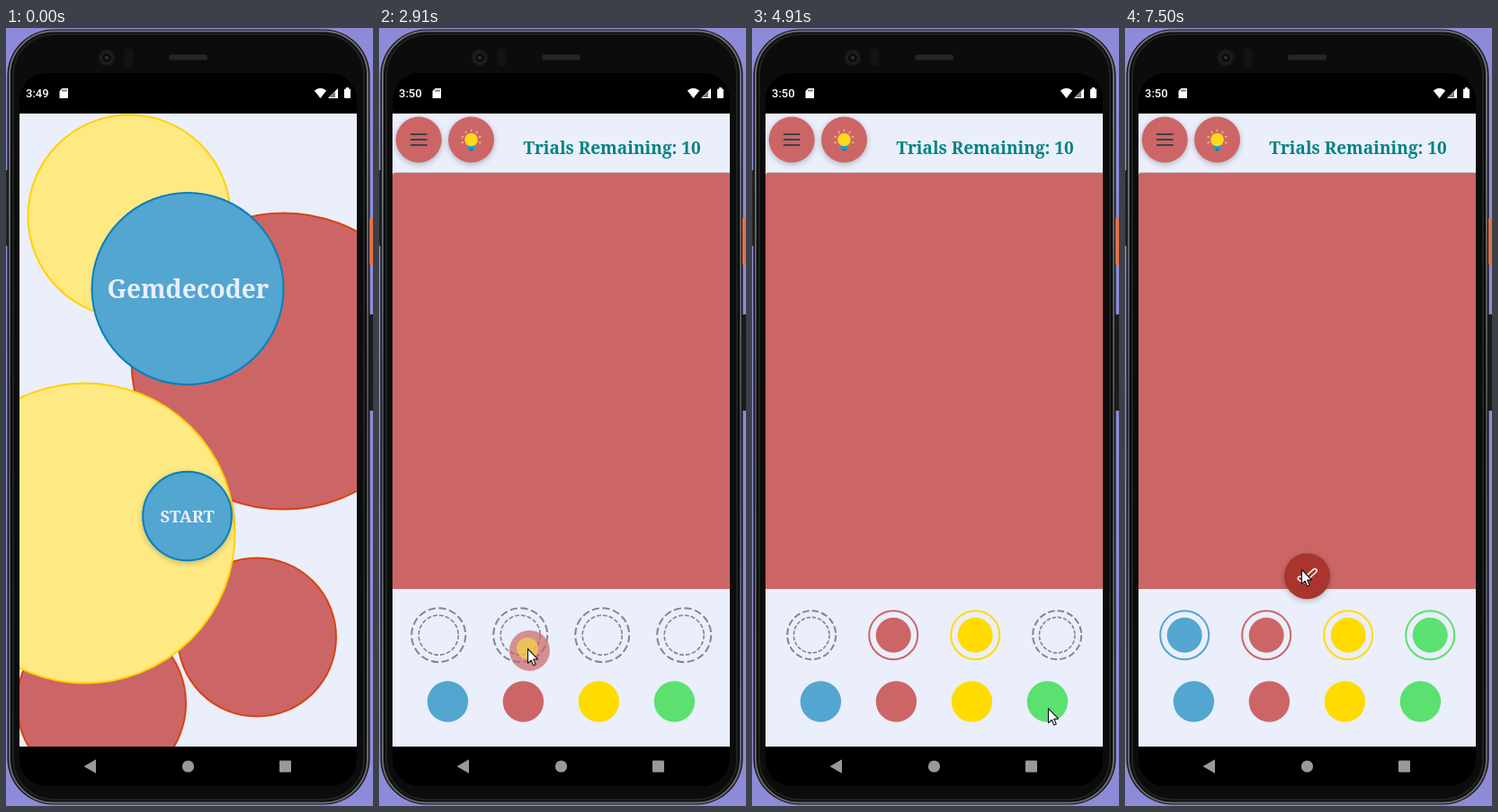
Recreate the animation shown at these times as an HTML page with a canvas. Size 408 px wide and 864 px high, loop 8 s.

```html
<!DOCTYPE html>
<html lang="en">
<head>
<meta charset="utf-8">
<title>Colour code game</title>
<style>
html, body { margin: 0; width: 100%; height: 100%; overflow: hidden; background: #8d8bd8; }
canvas { display: block; width: 408px; height: 864px; }
</style>
</head>
<body>
<canvas id="stage"></canvas>
<script>
const W = 408, H = 864, LOOP = 8000, TAU = Math.PI * 2;
const canvas = document.getElementById('stage');
const dpr = window.devicePixelRatio || 1;
canvas.width = W * dpr;
canvas.height = H * dpr;
const c = canvas.getContext('2d');

const PALE = '#ebeefb', RED = '#cc6666', BLUE = '#52a6d0', GRAY = '#858588';
const COLORS = [BLUE, RED, '#ffdb00', '#5ae170'];
const DISPLAY = '"Noto Serif", serif';
const slotX = i => 66.2 + 91 * i;
const potX = i => 76.4 + 84 * i;
const SLOT_Y = 674.2, POT_Y = 748, FAB_AT = 6980;

// Pointer path: time, x, y
const PATH = [
  [380, 333, 663], [840, 196, 545], [1770, 196, 545], [2110, 172, 734],
  [2640, 172, 734], [2910, 165, 689], [3120, 160, 678], [3300, 160, 678],
  [3510, 178, 706], [3800, 246, 761], [3960, 246, 760], [4250, 248, 690],
  [4400, 250, 680], [4540, 252, 682], [4860, 329, 755], [5110, 329, 757],
  [5440, 362, 657], [5580, 348, 668], [5700, 346, 671], [6220, 79, 761],
  [6380, 77, 748], [6460, 77, 748], [6780, 68, 682], [7000, 68, 680],
  [7400, 196, 601]
];

// Each drag: palette index, press, lift and drop times
const DRAGS = [
  { k: 1, press: 2570, lift: 2640, drop: 3260 },
  { k: 2, press: 3840, lift: 3920, drop: 4480 },
  { k: 3, press: 4980, lift: 5050, drop: 5660 },
  { k: 0, press: 6330, lift: 6400, drop: FAB_AT }
];

const clamp = v => Math.max(0, Math.min(1, v));
const ease = v => v * v * (3 - 2 * v);

function pointer(t) {
  let i = 0;
  while (i < PATH.length - 1 && PATH[i + 1][0] <= t) i++;
  const a = PATH[i], b = PATH[i + 1] || a;
  const p = b === a ? 0 : ease(clamp((t - a[0]) / (b[0] - a[0])));
  return [a[1] + (b[1] - a[1]) * p, a[2] + (b[2] - a[2]) * p];
}

function paint(fill, stroke, width) {
  if (fill) { c.fillStyle = fill; c.fill(); }
  if (stroke) { c.strokeStyle = stroke; c.lineWidth = width; c.stroke(); }
}

function disc(x, y, r, fill, stroke, width = 2) {
  c.beginPath();
  c.arc(x, y, r, 0, TAU);
  paint(fill, stroke, width);
}

function box(x, y, w, h, r, fill, stroke, width) {
  c.beginPath();
  c.roundRect(x, y, w, h, r);
  paint(fill, stroke, width);
}

function shape(points, fill, stroke, width, open) {
  c.beginPath();
  points.forEach(([x, y]) => c.lineTo(x, y));
  if (!open) c.closePath();
  paint(fill, stroke, width);
}

function text(s, x, y, font, color, align = 'center') {
  c.font = font;
  c.fillStyle = color;
  c.textAlign = align;
  c.fillText(s, x, y);
}

function raised(x, y, r, fill) {
  c.save();
  c.shadowColor = 'rgba(0,0,0,.25)';
  c.shadowBlur = 6 * dpr;
  c.shadowOffsetY = 2 * dpr;
  disc(x, y, r, fill);
  c.restore();
}

function dashed(x, y, r, color, width, count) {
  const step = TAU * r / count;
  c.setLineDash([step * .7, step * .3]);
  disc(x, y, r, null, color, width);
  c.setLineDash([]);
}

function phone() {
  c.fillStyle = '#8d8bd8';
  c.fillRect(0, 0, W, H);
  box(-3, 158, 7, 84, 2, '#29292b');
  box(1.5, 1.5, 403, 861, 51, '#161617');
  const rim = c.createLinearGradient(0, 0, 0, H);
  rim.addColorStop(0, '#6a6c6e');
  rim.addColorStop(.12, '#707274');
  rim.addColorStop(.5, '#4a4c4e');
  rim.addColorStop(1, '#6a6c6e');
  box(4, 3.5, 398, 857, 49, '#0c0c0d', rim, 2);
  box(8, 7, 390, 850, 45, '#0c0c0d', '#202122', 2);
  box(15, 50, 375, 792, 30, '#000');
  box(404, 211, 8, 52, 1, '#e0714a');
  box(404, 318, 8, 107, 1, '#1b1b1d');

  disc(112, 33, 9.5, '#171718');
  disc(112, 33, 6, '#0c0c0d', '#242527', 1.5);
  disc(112, 33, 2, '#303234');
  box(131.5, 23, 10, 20, 4, '#131314');
  box(181, 29.5, 43, 6, 3, '#262628');
}

function bars(t) {
  text(t < 640 ? '3:49' : '3:50', 22, 77.3, '500 13px Roboto, sans-serif', '#fff', 'left');
  shape([[62.5, 67], [69, 67], [69, 78], [59.5, 78], [59.5, 70]], '#fff');
  c.fillStyle = '#000';
  [62.5, 64.5, 66.5].forEach(x => c.fillRect(x, 68.5, 1, 2));
  c.beginPath();
  c.moveTo(349.5, 78);
  c.lineTo(342.8, 69.5);
  c.quadraticCurveTo(349.5, 64.2, 356.2, 69.5);
  c.closePath();
  paint('#fff');
  shape([[369, 67], [369, 78], [358, 78]], '#fff');
  shape([[366, 70.5], [366, 77], [359.8, 77]], '#777');
  box(376, 67.5, 7, 10.5, 1, '#fff');
  box(378, 66, 3, 2, 0, '#fff');

  shape([[86.5, 820], [100, 812.3], [100, 827.7]], '#999');
  disc(202.5, 820, 6.6, '#999');
  box(304, 813.5, 13, 13, 1, '#999');
}

function startScreen() {
  const rust = '#d84310', gold = '#ffd200', sea = '#0080c0', lemon = '#ffe983';
  c.fillStyle = PALE;
  c.fillRect(15, 95, 375, 703);
  disc(137, 209, 112.5, lemon, gold);
  c.beginPath();
  c.ellipse(308.5, 370, 169, 164.5, 0, 0, TAU);
  paint(RED, rust, 2);
  disc(279, 676.5, 88, RED, rust);
  disc(106, 750, 94, RED, rust);
  disc(88, 561, 166.5, lemon, gold);
  disc(202, 289.5, 106.5, BLUE, sea);
  raised(201.5, 542, 50, BLUE);
  disc(201.5, 542, 49.3, BLUE, sea);
  text('Gemdecoder', 202.5, 300, 'bold 28px ' + DISPLAY, PALE);
  text('START', 201.5, 549, 'bold 18.5px ' + DISPLAY, PALE);
}

function bulb(x, y) {
  for (let i = 0; i < 7; i++) {
    const a = Math.PI * (.9 + i * .2), u = Math.cos(a), v = Math.sin(a);
    shape([[x + u * 9, y + v * 9], [x + u * 11.5, y + v * 11.5]], null, '#f3c08a', 1.4, true);
  }
  box(x - 4, y + 5, 8, 6, 1, '#1b9fcb');
  box(x - 2, y + 10, 4, 2.5, 1, '#167fa6');
  disc(x, y, 7.3, '#ffd91a');
}

function slot(i, color, wide) {
  const x = slotX(i), outer = wide ? 30 : 27;
  if (color) {
    disc(x, SLOT_Y, wide ? 22 : 19.5, color);
    if (wide) dashed(x, SLOT_Y, outer, color, 2, 16);
    else disc(x, SLOT_Y, outer, null, color);
  } else {
    dashed(x, SLOT_Y, outer, GRAY, 2, 16);
    dashed(x, SLOT_Y, wide ? 22 : 19.8, GRAY, 1.6, 20);
  }
}

function checkButton(t) {
  const s = ease(clamp((t - FAB_AT) / 200));
  if (!s) return;
  c.save();
  c.translate(202.5, 608.7);
  c.scale(s, s);
  raised(0, 0, 25.5, '#a9352e');
  c.lineCap = c.lineJoin = 'round';
  const tick = [[-8, 2.5], [-3.5, 5], [8.5, -6]];
  shape(tick, null, '#fff', 5.8, true);
  shape(tick, null, '#a9352e', 2.8, true);
  c.restore();
}

function gameScreen(t) {
  c.fillStyle = PALE;
  c.fillRect(15, 95, 375, 703);
  c.fillStyle = '#cdbfc8';
  c.fillRect(17, 160, 373, 1);
  box(15, 161, 375, 462, [2, 0, 0, 0], RED);
  raised(44.2, 124, 25.5, RED);
  raised(102.5, 124, 25.5, RED);
  c.fillStyle = '#37434a';
  [118, 124, 130].forEach(y => c.fillRect(35, y - 1, 18.5, 2));
  bulb(102.5, 124);
  text('Trials Remaining: 10', 259, 140, 'bold 19px ' + DISPLAY, '#008384');

  const wide = DRAGS.some(d => t >= d.lift && t < d.drop);
  COLORS.forEach((color, i) => {
    const done = DRAGS.some(d => d.k === i && t >= d.drop);
    slot(i, done && color, wide);
    disc(potX(i), POT_Y, 22.7, color);
  });
  checkButton(t);
}

function cursor(t) {
  if (t < 380) return;
  const [x, y] = pointer(t);
  const drag = DRAGS.find(d => t >= d.press && t < d.drop);
  if (drag && t >= drag.lift) {
    // The dragged copy starts exactly on its pot
    const p = clamp((t - drag.lift) / 150);
    const mix = (a, b) => a + (b - a) * p;
    c.globalAlpha = .7;
    disc(mix(potX(drag.k), x + 2.4), mix(POT_Y, y + 2.4), 22.5, COLORS[drag.k]);
    c.globalAlpha = 1;
  }
  if (drag || (t >= 1310 && t < 1450)) disc(x, y, 12, 'rgba(255,236,40,.55)');
  c.save();
  c.translate(x + .5, y + .5);
  c.lineJoin = 'round';
  shape([[0, 0], [0, 16], [3.7, 12.6], [6.2, 18.4], [8.7, 17.3], [6.2, 11.6], [11, 11.4]],
    '#fff', '#111', 1.1);
  c.restore();
}

function draw(t) {
  c.setTransform(dpr, 0, 0, dpr, 0, 0);
  phone();
  c.save();
  c.beginPath();
  c.rect(15, 95, 375, 703);
  c.clip();
  const fade = clamp((t - 1340) / 160);
  if (fade < 1) startScreen();
  if (fade > 0) {
    c.globalAlpha = fade;
    gameScreen(t);
    c.globalAlpha = 1;
  }
  c.restore();
  bars(t);
  cursor(t);
}

const begin = performance.now();
function frame() {
  draw((performance.now() - begin) % LOOP);
  requestAnimationFrame(frame);
}
draw(0);
requestAnimationFrame(frame);
</script>
</body>
</html>
```
